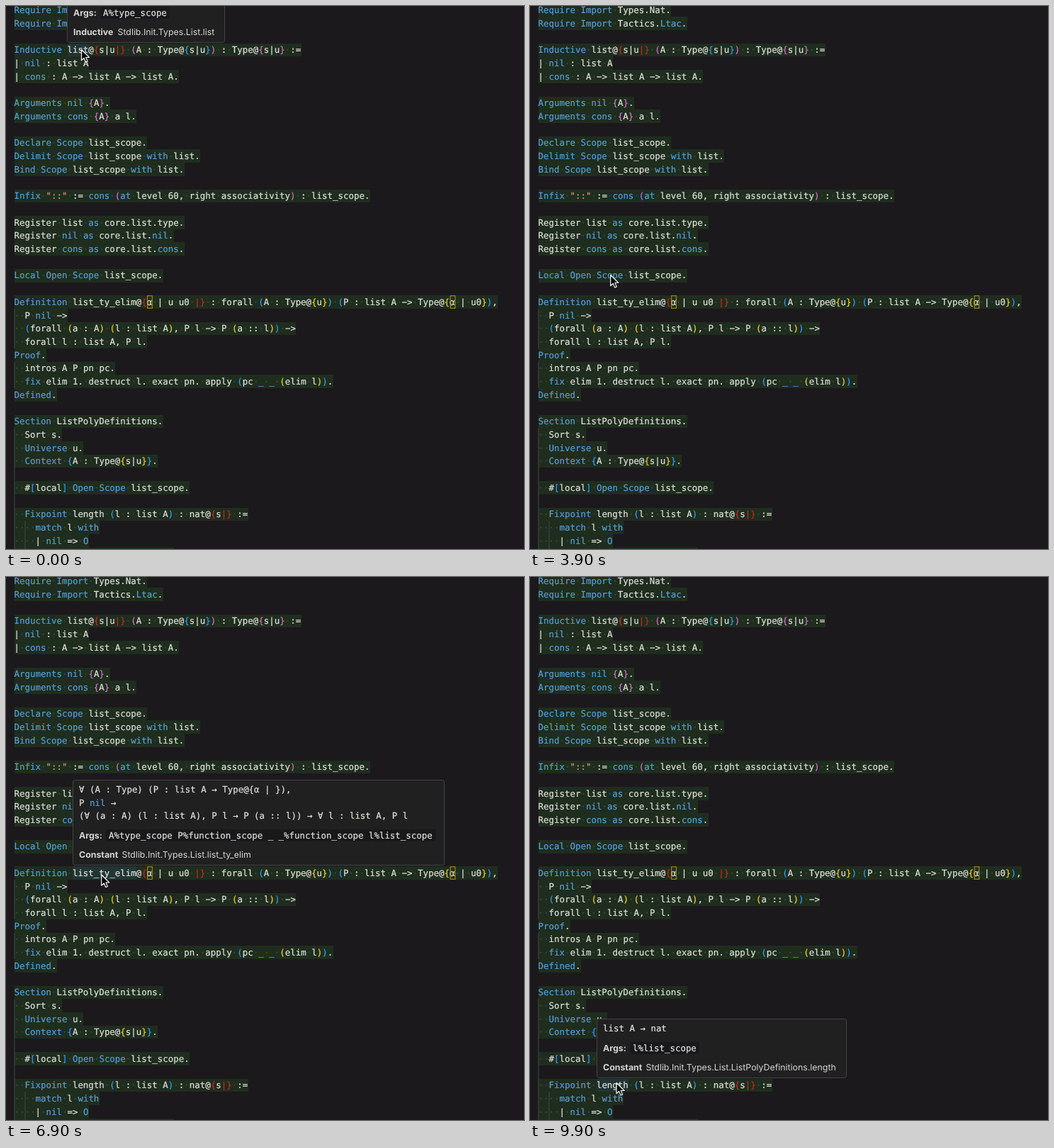
Animation of 731 by 766 pixels, one loop 10 s. Source, as an HTML page:

```html
<!DOCTYPE html>
<html lang="en">
<head>
<meta charset="utf-8">
<title>Hover hints</title>
<style>
  html, body { margin: 0; width: 100%; height: 100%; overflow: hidden; background: #1b191c; }
  svg { display: block; width: 731px; height: 766px; }
  text { white-space: pre; text-rendering: geometricPrecision; fill: #dfdfdb; }
  .mono { font-family: "DejaVu Sans Mono", "Liberation Mono", monospace; font-size: 12.457px; stroke-width: 0.22px; }
  .sans { font-family: Inter, "Open Sans", sans-serif; font-size: 12.35px; fill: #d6d6d6; }
  .bold { font-weight: 700; }
</style>
</head>
<body>
<svg id="stage" viewBox="0 0 731 766"></svg>
<script>
const NS = "http://www.w3.org/2000/svg";
const LOOP = 10000, LEFT = 11.5, CHAR = 7.5, LINE = 18.71, TOP = -3.4;
const WHITE = "#dfdfdb", BLUE = "#569cd6", RED = "#bd2a22", DOT = "#3c4c39";
const BRACKETS = ["#f2cf1d", "#cf70cb", "#2f9cf0"];

// "‹" stands for an unmatched opening brace, shown in red.
const CODE = `Require Import Types.Nat.
Require Import Tactics.Ltac.

Inductive list@‹s|u|} (A : Type@{s|u}) : Type@{s|u} :=
| nil : list A
| cons : A -> list A -> list A.

Arguments nil {A}.
Arguments cons {A} a l.

Declare Scope list_scope.
Delimit Scope list_scope with list.
Bind Scope list_scope with list.

Infix "::" := cons (at level 60, right associativity) : list_scope.

Register list as core.list.type.
Register nil as core.list.nil.
Register cons as core.list.cons.

Local Open Scope list_scope.

Definition list_ty_elim@‹α | u u0 |} : forall (A : Type@{u}) (P : list A -> Type@{α | u0}),
  P nil ->
  (forall (a : A) (l : list A), P l -> P (a :: l)) ->
  forall l : list A, P l.
Proof.
  intros A P pn pc.
  fix elim 1. destruct l. exact pn. apply (pc _ _ (elim l)).
Defined.

Section ListPolyDefinitions.
  Sort s.
  Universe u.
  Context {A : Type@{s|u}}.

  #[local] Open Scope list_scope.

  Fixpoint length (l : list A) : nat@‹s|} :=
    match l with
    | nil => O`.split("\n");

const KEYWORDS = new Set(("Require Import Ltac Inductive nil cons Arguments Declare Delimit Bind " +
  "Scope with Infix at as Local Open Definition Proof fix Defined Section Universe Context " +
  "Fixpoint match O _").split(" "));

const stage = document.getElementById("stage");

function add(parent, tag, attrs, content) {
  const el = document.createElementNS(NS, tag);
  for (const key in attrs) el.setAttribute(key, attrs[key]);
  if (content !== undefined) el.textContent = content;
  parent.appendChild(el);
  return el;
}

const lineTop = row => TOP + row * LINE;

// The thin stroke in the fill colour gives the code its slightly heavy look.
function span(parent, content, fill = WHITE) {
  add(parent, "tspan", { fill, stroke: fill }, content);
}

function drawBand(row, length) {
  add(stage, "rect", {
    x: LEFT, y: lineTop(row), width: length * CHAR, height: LINE,
    fill: "#1f2d1e", "shape-rendering": "crispEdges"
  });
}

function drawGuide(column, from, to) {
  add(stage, "rect", {
    x: LEFT + column * CHAR, y: lineTop(from), width: 1, height: (to - from) * LINE, fill: "#414a40"
  });
}

function drawCode(source, row) {
  const text = add(stage, "text", { class: "mono", x: LEFT, y: lineTop(row) + 13.6 });
  const tokens = /(\|\}|‹)|("[^"]*")|(\w+)|([({\[])|([)}\]])|( +)|(.)/g;
  let depth = row < 22 ? 1 : 2;
  // A minus sign gives arrows their long shaft.
  for (const [all, red, string, word, open, close, space] of source.replace(/->/g, "−>").matchAll(tokens)) {
    if (red) span(text, all === "‹" ? "{" : all, RED);
    else if (string) span(text, all, "#ce9178");
    else if (word) span(text, all, KEYWORDS.has(all) ? BLUE : WHITE);
    else if (open) span(text, all, BRACKETS[depth++ % 3]);
    else if (close) span(text, all, BRACKETS[--depth % 3]);
    else if (space) span(text, "·".repeat(all.length), DOT);
    else span(text, all);
  }
}

function drawMark(row, column) {
  add(stage, "rect", {
    x: LEFT + column * CHAR + 0.7, y: lineTop(row) + 0.6, width: 6.6, height: LINE - 1.2,
    fill: "none", stroke: "#bd9b03"
  });
}

function addHighlight(row, column, length) {
  return add(stage, "rect", {
    x: LEFT + column * CHAR, y: lineTop(row), width: length * CHAR, height: LINE,
    fill: "#213534", "shape-rendering": "crispEdges"
  });
}

// The last two rows of a tooltip sit at fixed distances from its bottom edge.
function addTooltip({ x, y, width, bottom, type, args, kind, path, pathX }) {
  const g = add(stage, "g", {});
  const left = x + 9;
  const mono = (textX, textY) => add(g, "text", { class: "mono", x: textX, y: textY });
  add(g, "rect", {
    x: x + 0.5, y: y + 0.5, width: width - 1, height: bottom - y - 1,
    rx: 3, fill: "#202021", stroke: "#424244"
  });
  type.forEach((source, i) => {
    const text = mono(left, y + 18 + i * LINE);
    for (const part of source.split(/(\bnil\b)/)) span(text, part, part === "nil" ? BLUE : WHITE);
  });
  add(g, "text", { class: "sans bold", x: left, y: bottom - 38 }, "Args:");
  add(g, "rect", {
    x: left + 38, y: bottom - 51, width: args.length * CHAR + 8, height: 17, rx: 3, fill: "#19181a"
  });
  span(mono(left + 42, bottom - 38), args);
  add(g, "text", { class: "sans bold", x: left, y: bottom - 11 }, kind);
  add(g, "text", { class: "sans", x: pathX, y: bottom - 11 }, path);
  return g;
}

CODE.forEach((source, row) => drawBand(row, source.length));
drawBand(CODE.length, 30);
const highlights = [addHighlight(3, 10, 4), addHighlight(22, 11, 12), addHighlight(38, 11, 6)];
drawGuide(0, 23, 26);
drawGuide(0, 27, 29);
drawGuide(0, 32, 42);
drawGuide(2, 39, 42);
CODE.forEach(drawCode);
drawMark(22, 25);
drawMark(22, 82);

const tooltips = [
  {
    x: 86, y: -60, width: 223, bottom: 52, type: [], args: "A%type_scope",
    kind: "Inductive", path: "Stdlib.Init.Types.List.list", pathX: 157.5
  },
  {
    x: 94, y: 286, width: 525, bottom: 407,
    type: [
      "∀ (A : Type) (P : list A → Type@{α | }),",
      "P nil →",
      "(∀ (a : A) (l : list A), P l → P (a :: l)) → ∀ l : list A, P l"
    ],
    args: "A%type_scope P%function_scope _ _%function_scope l%list_scope",
    kind: "Constant", path: "Stdlib.Init.Types.List.list_ty_elim", pathX: 163.5
  },
  {
    x: 94, y: 623, width: 353, bottom: 707, type: ["list A → nat"], args: "l%list_scope",
    kind: "Constant", path: "Stdlib.Init.Types.List.ListPolyDefinitions.length", pathX: 163.5
  }
].map(addTooltip);

const cursor = add(stage, "path", {
  d: "M0 0V15.2L3.5 12L6 17.6L8.6 16.5L6.2 11H11Z",
  fill: "#050505", stroke: "#f4f4f4", "stroke-width": 1.2, "stroke-linejoin": "round"
});

// Start of fade-in and moment of hiding for each hint.
const HOVERS = [[-500, 3150], [4600, 7550], [8480, LOOP]];
const FADE = 100;

// Cursor stops: time, x, y.
const STOPS = [
  [0, 106.5, 61.5], [200, 104.7, 60.5], [2950, 104.7, 60.5], [3850, 113.7, 379.5],
  [3950, 113.7, 379.5], [4300, 134.7, 420], [7400, 134.7, 420], [8200, 122, 713.5],
  [LOOP, 122, 713.5]
];

const clamp = v => Math.min(1, Math.max(0, v));
const ease = v => v * v * (3 - 2 * v);

function cursorAt(t) {
  const i = STOPS.findIndex(stop => stop[0] > t);
  const [t0, x0, y0] = STOPS[i - 1], [t1, x1, y1] = STOPS[i];
  const k = ease((t - t0) / (t1 - t0));
  return [x0 + (x1 - x0) * k, y0 + (y1 - y0) * k];
}

function render(t) {
  HOVERS.forEach(([start, end], i) => {
    const active = t >= start && t < end;
    highlights[i].setAttribute("opacity", active ? 1 : 0);
    tooltips[i].setAttribute("opacity", active ? clamp((t - start) / FADE) : 0);
  });
  cursor.setAttribute("transform", `translate(${cursorAt(t)})`);
}

const began = performance.now();

function tick() {
  render((performance.now() - began) % LOOP);
  requestAnimationFrame(tick);
}

tick();
</script>
</body>
</html>
```
